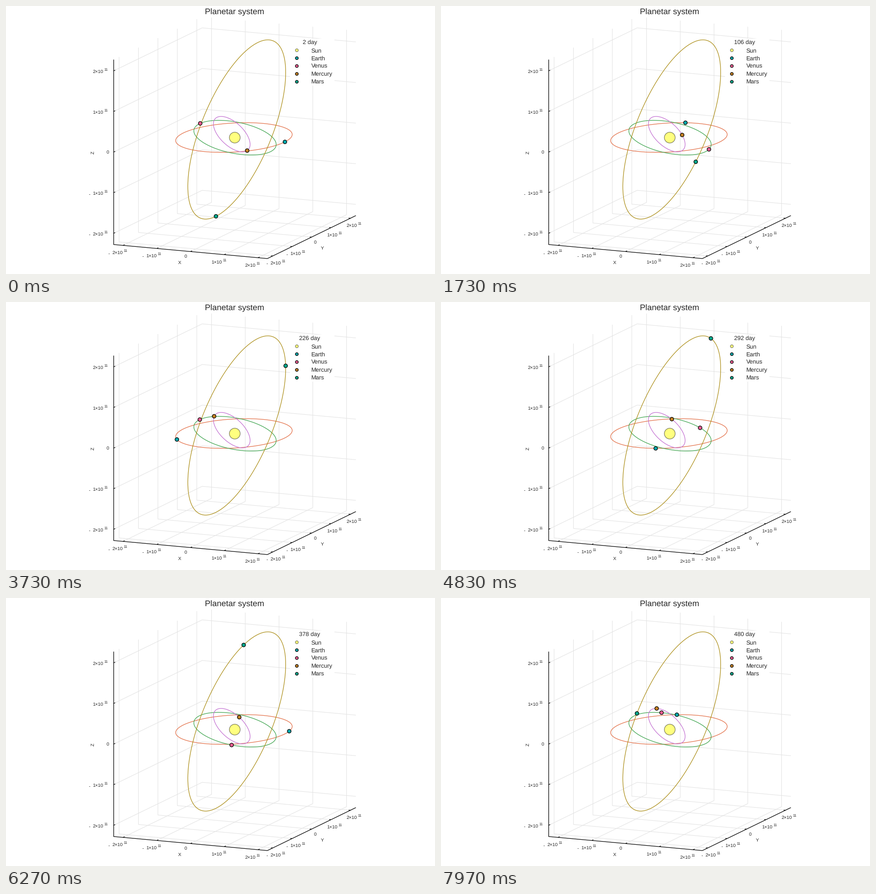
Write a matplotlib script that moves like this. It is 947 by 592 pixels and loops after 8000 ms.

```python
import numpy as np
import matplotlib.pyplot as plt
from matplotlib.animation import FuncAnimation
from matplotlib.patches import Circle, Rectangle

W, H, DPI = 947, 592, 64
PT = 72 / DPI                      # points per pixel
STEP, LOOP = 10, 8000              # ms per drawn frame, ms per loop
RATE = 0.03                        # simulation steps per ms
LIM = 2.277                        # half width of the box, in 1e11 m
TICKS = range(-2, 3)
INK = "#262626"

# Parallel projection: screen steps for one unit along x, y and z
SUN = np.array([505.0, 290.7])
EX = np.array([74.5, 6.81])
EY = np.array([42.9, -20.85])
EZ = np.array([0.0, -89.7])

# name, semi-major axis, eccentricity, period, tilt (rad), orbit and body colour
PLANETS = [
    ("Earth", 1.496, 0.0167, 365.26, 0.0, "#e36f47", "#00aaae"),
    ("Venus", 1.082, 0.0068, 224.70, 3.39, "#3ea44e", "#ed5e93"),
    ("Mercury", 0.579, 0.2056, 87.97, 7.005, "#c371d2", "#c68225"),
    ("Mars", 2.279, 0.0934, 686.98, 1.85, "#ac8e18", "#00a98d"),
]

plt.rcParams["font.family"] = "Liberation Sans"
plt.rcParams["text.hinting"] = "none"
fig = plt.figure(figsize=(W / DPI, H / DPI), dpi=DPI, facecolor="white")


def pixel_axes():
    axes = fig.add_axes([0, 0, 1, 1])
    axes.set_xlim(0, W)
    axes.set_ylim(H, 0)
    axes.axis("off")
    return axes


def project(x, y, z):
    p = [SUN[i] + x * EX[i] + y * EY[i] + z * EZ[i] for i in (0, 1)]
    return np.array(p)


def orbit(angle, a, ecc, tilt):
    u = a * (np.cos(angle) - ecc)
    v = a * np.sqrt(1 - ecc ** 2) * np.sin(angle)
    return project(u * np.cos(tilt), v, -u * np.sin(tilt))


def line(points, color, width, z):
    xs, ys = np.array(points).T
    ax.plot(xs, ys, color=color, lw=width * PT, zorder=z,
            solid_capstyle="butt")


def label(x, y, s, size, ha="left", **kw):
    return ax.text(x, y, s, fontsize=size * PT, ha=ha, color=INK,
                   va="baseline", zorder=8, **kw)


def disc(xy, r, face, edge="black", width=1.3, z=5):
    return ax.add_patch(Circle(xy, r, facecolor=face, edgecolor=edge,
                               linewidth=width * PT, zorder=z))


def tick_label(n, x, y):
    """Write n x 10^11 with the digit starting at x, centred on y."""
    base = y + 3.7
    if n == 0:
        label(x, base, "0", 10.4)
        return
    if n < 0:
        label(x - 8, base, "-", 10.4)
    label(x, base, f"{abs(n)}×10", 10.4)
    label(x + 25.6, base - 5.8, "11", 8.2)


def draw_box():
    lo, hi = -LIM, LIM
    for t in TICKS:
        for path in (
            [(t, lo, lo), (t, hi, lo), (t, hi, hi)],
            [(hi, t, lo), (lo, t, lo), (lo, t, hi)],
            [(lo, lo, t), (lo, hi, t), (hi, hi, t)],
        ):
            line([project(*p) for p in path], "#e3e3e3", 1.1, 1)
        for start, end in (
            ((t, lo, lo), (t, lo + 0.08, lo)),
            ((hi, t, lo), (hi - 0.055, t, lo)),
            ((lo, lo, t), (lo, lo + 0.08, t)),
        ):
            line([project(*start), project(*end)], "black", 1.2, 2)
    edge = [(lo, lo, hi), (lo, lo, lo), (hi, lo, lo), (hi, hi, lo)]
    line([project(*p) for p in edge], "black", 1.3, 2)


def draw_labels():
    label(504, 16.8, "Planetar system", 18.2, "center")
    for n in TICKS:
        tick_label(n, 191 if n else 221.3, 323.5 - 89.7 * n + (n != 0))
    for n, x, y in zip(TICKS, (234, 309, 393.5, 453, 527),
                       (545.5, 552, 553, 566, 573)):
        tick_label(n, x, y)
    for n, x, y in zip(TICKS, (583, 627, 680, 708, 751),
                       (568, 547.5, 522, 506, 485)):
        tick_label(n, x, y)
    label(383, 569.8, "X", 10.4, "center")
    label(698, 538.2, "Y", 10.4, "center")
    label(187.3, 325.2, "Z", 10.4, rotation=90)


def draw_legend():
    ax.add_patch(Rectangle((627, 72), 98, 104, facecolor="white",
                           edgecolor="none", zorder=3))
    rows = [("Sun", (1, 1, 0, 0.5), (0, 0, 0, 0.5))]
    rows += [(p[0], p[6], "black") for p in PLANETS]
    for i, (name, face, edge) in enumerate(rows):
        y = 97.8 + 17.4 * i
        disc((642, y), 3.2, face, edge, z=7)
        label(673.5, y + 4.7, name, 13)


def draw_orbits():
    turn = np.linspace(0, 2 * np.pi, 400)
    for _, a, ecc, _, tilt, color, _ in PLANETS:
        line(orbit(turn, a, ecc, tilt).T, color, 1.3, 4)
    disc(SUN, 11.9, (1, 1, 0, 0.5), (0, 0, 0, 0.5))


# Everything that stands still is rendered once and reused as a backdrop
ax = pixel_axes()
draw_box()
draw_labels()
draw_legend()
draw_orbits()
fig.canvas.draw()
backdrop = np.array(fig.canvas.buffer_rgba())
fig.clear()
fig.figimage(backdrop, zorder=-1, origin="upper")

ax = pixel_axes()
bodies = [disc(SUN, 4.1, p[6], z=6 + i / 10) for i, p in enumerate(PLANETS)]
day_text = label(670.5, 84.7, "", 13, "center")


def update(n):
    k = int((n * STEP + 4) * RATE)     # step times are rounded to 10 ms
    day = 2 * k + 1
    for body, (_, a, ecc, period, tilt, _, _) in zip(bodies, PLANETS):
        body.center = tuple(orbit(2 * np.pi * day / period, a, ecc, tilt))
    day_text.set_text(f"{2 * k + 2} day")
    return bodies + [day_text]


anim = FuncAnimation(fig, update, frames=LOOP // STEP, interval=STEP,
                     repeat=True, repeat_delay=0, blit=False)
plt.show()
```
